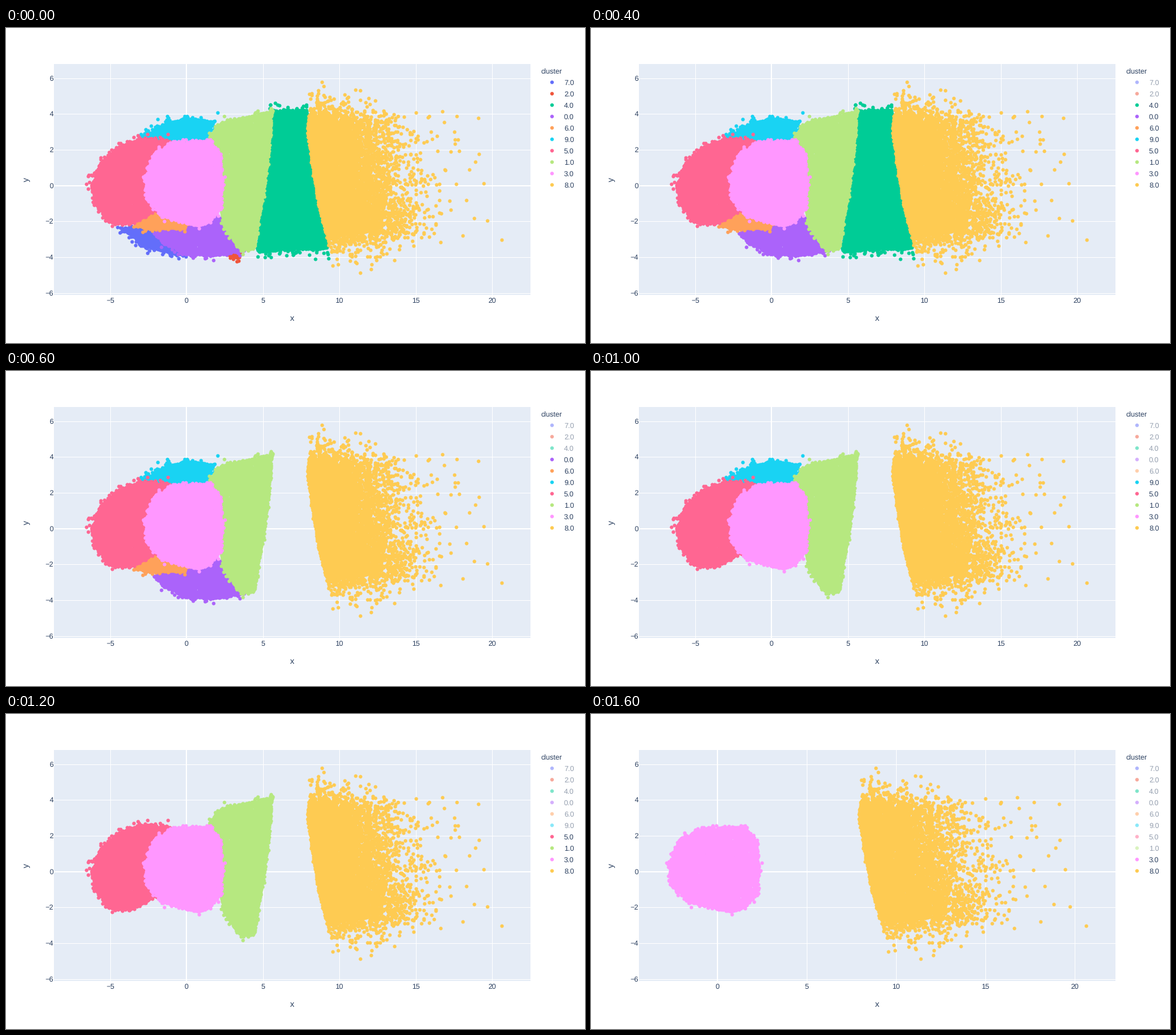
Animation, 966 px wide and 525 px high, one loop 1.8 s. Source, as a matplotlib script:

```python
import matplotlib.pyplot as plt
import numpy as np
from matplotlib.animation import FuncAnimation
from matplotlib.patches import Circle
from matplotlib.path import Path

W, H, DPI = 966, 525, 100
PT = 72 / DPI                          # points per pixel
LEFT, RIGHT, TOP, BOTTOM = 80, 875, 60, 445
INK = "#2a3f5f"
X0, XS, Y0, YS = 301.3, 25.48, 262.8, 29.83
WIDE, NARROW = (X0, XS), (210.8, 29.82)  # (pixel of zero, pixels per unit)
ZOOM_STEP = 7                            # clusters hidden when the x axis rescales

rng = np.random.default_rng(7)
plt.rcParams["font.family"] = "Liberation Sans"
plt.rcParams["text.hinting"] = "none"


def blob(outline, fuzz):
    """Dense dots inside an outline plus a rim with heavy-tailed scatter."""
    poly = np.array(outline, float)
    lo, hi = poly.min(0), poly.max(0)
    fill = rng.uniform(lo, hi, (int(np.prod(hi - lo) * 0.35), 2))
    fill = fill[Path(poly).contains_points(fill)]
    step = np.roll(poly, -1, 0) - poly
    length = np.hypot(*step.T)
    n = int(length.sum() * 0.5)
    edge = rng.choice(len(poly), n, p=length / length.sum())
    rim = poly[edge] + step[edge] * rng.random((n, 1))
    rim += rng.laplace(0, 1, (n, 2)) * fuzz
    return np.vstack([fill, rim])


def fan(core=5000, far=2500):
    """Sharp left border, density fading out to the right."""
    n = core + far
    y = 247 + rng.uniform(-95, 95, n) + rng.laplace(0, 14, n)
    border = np.interp(y, [125, 170, 250, 300, 378], [506, 503, 514, 523, 542])
    reach = np.concatenate([abs(rng.normal(0, 62, core)),
                            rng.exponential(46, far)])
    x = border + reach + rng.normal(0, 0.8, n)
    keep = (x < 832) & (y > 82) & (y < 423)
    return np.column_stack([x, y])[keep]


# Name, colour and dots in wide-view pixels, in drawing order
CLUSTERS = [
    ("7.0", "#636efa", blob([(191, 333), (255, 338), (300, 380), (235, 365)],
                            (3, 3))),
    ("2.0", "#ef553b", blob([(374, 380), (391, 375), (386, 384)], (2, 2))),
    ("4.0", "#00cc96", blob([(440, 137), (501, 137), (510, 215), (538, 366),
                             (420, 373), (432, 250)], (0.8, 4.5))),
    ("0.0", "#ab63fa", blob([(250, 337), (355, 315), (398, 371), (355, 378),
                             (300, 377), (260, 357)], (2, 3.2))),
    ("6.0", "#ffa15a", blob([(215, 328), (247, 300), (305, 326), (285, 334),
                             (230, 333)], (2, 2))),
    ("9.0", "#19d3f3", blob([(228, 180), (262, 161), (300, 150), (347, 156),
                             (330, 190)], (2.5, 3))),
    ("5.0", "#ff6692", blob([(143, 262), (156, 227), (189, 198), (225, 184),
                             (270, 186), (285, 250), (243, 308), (205, 327),
                             (168, 321), (147, 288)], (3, 2.5))),
    ("1.0", "#b6e880", blob([(339, 180), (360, 158), (443, 139), (438, 200),
                             (431, 262), (413, 368), (398, 369), (378, 353),
                             (362, 325), (350, 195)], (0.8, 3.2))),
    ("3.0", "#ff97ff", blob([(232, 250), (248, 208), (284, 190), (340, 188),
                             (357, 212), (360, 262), (357, 300), (340, 322),
                             (320, 329), (263, 314), (236, 286)], (1.6, 2))),
    ("8.0", "#fecb52", fan()),
]

fig = plt.figure(figsize=(W / DPI, H / DPI), dpi=DPI, facecolor="white")

plot = fig.add_axes([LEFT / W, 1 - BOTTOM / H,
                     (RIGHT - LEFT) / W, (BOTTOM - TOP) / H])
plot.set_facecolor("#e5ecf6")
plot.set(xticks=[], yticks=[])
plot.spines[:].set_visible(False)

# Full-stage layer in pixel units for labels and legend
page = fig.add_axes([0, 0, 1, 1], facecolor="none")
page.set(xlim=(0, W), ylim=(H, 0))
page.axis("off")


def label(x, y, text, size=12, **kw):
    return page.text(x, y, text, size=size * PT, color=INK, **kw)


def signed(v):
    return str(v).replace("-", "\u2212")


x_ticks = range(-5, 21, 5)
for v in x_ticks:
    plot.axvline(v, color="white", lw=(1 if v else 2) * PT, zorder=0)
for v in range(-6, 7, 2):
    plot.axhline(v, color="white", lw=(1 if v else 2) * PT, zorder=0)
    label(79, round(Y0 - YS * v) + 4, signed(v), ha="right")
x_labels = [label(0, 458, signed(v), ha="center") for v in x_ticks]

label(477.5, 488, "x", 14, ha="center")
label(34.5, 252.5, "y", 14, ha="center", va="center", rotation=90)
label(892.5, 76, "cluster")

clouds, keys = [], []
for row, (name, color, px) in enumerate(CLUSTERS):
    y = 90 + 19 * row
    x_data, y_data = (px[:, 0] - X0) / XS, (Y0 - px[:, 1]) / YS
    clouds += plot.plot(x_data, y_data, "o", ms=6 * PT, mew=0, color=color)
    key = page.add_patch(Circle((911, y + 0.5), 3, color=color, lw=0))
    keys.append((key, label(931, y + 5, name)))

plot.set_ylim((Y0 - BOTTOM) / YS, (Y0 - TOP) / YS)


def update(hidden):
    for i, (cloud, key) in enumerate(zip(clouds, keys)):
        cloud.set_visible(i >= hidden)
        for part in key:
            part.set_alpha(1 if i >= hidden else 0.5)
    zero, scale = NARROW if hidden >= ZOOM_STEP else WIDE
    plot.set_xlim((LEFT - zero) / scale, (RIGHT - zero) / scale)
    for v, text in zip(x_ticks, x_labels):
        x = zero + scale * v
        text.set_x(x)
        text.set_visible(LEFT <= x <= RIGHT)
    return clouds


anim = FuncAnimation(fig, update, frames=9, interval=200,
                     repeat=True, repeat_delay=0, blit=False)
plt.show()
```
